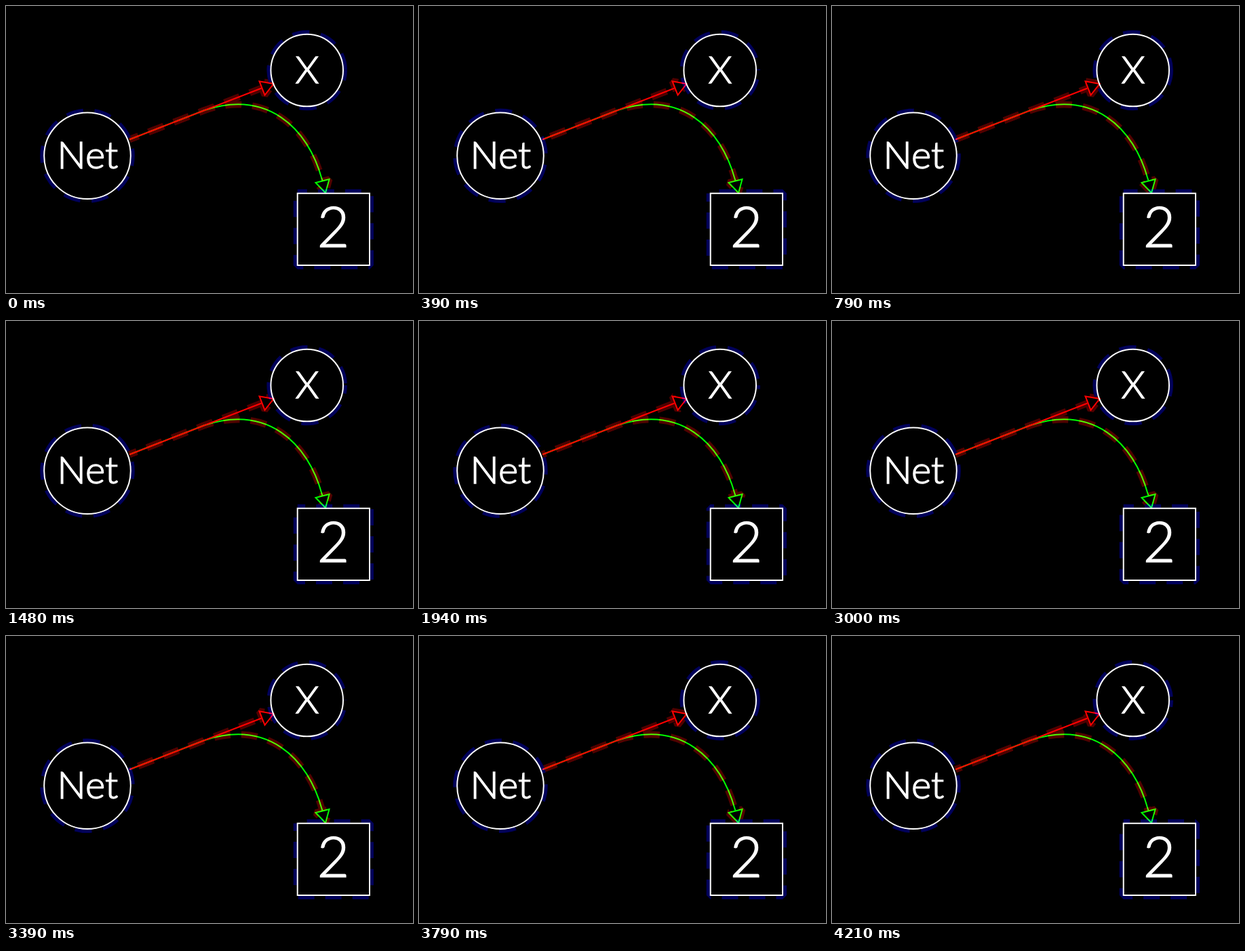
Recreate the animation shown at these times as an HTML page. Size 600 px wide and 424 px high, loop 4240 ms.

```html
<!DOCTYPE html>
<html lang="en">
<head>
<meta charset="utf-8">
<title>Graph</title>
<style>
  html, body { margin: 0; width: 100%; height: 100%; overflow: hidden; background: #000; }
  svg { display: block; width: 600px; height: 424px; }
  .halo { fill: none; stroke-width: 12; stroke-dasharray: 24 16; stroke-linejoin: bevel; }
  .node { fill: #000; stroke: #fff; stroke-width: 2; }
  .edges { fill: none; stroke-width: 2; mix-blend-mode: screen; }
  .red { stroke: #f00; }
  .green { stroke: #0f0; }
  #edgeHalos { stroke: #500000; }
  #edgeHalos .halo { stroke-width: 10; }
  #nodeHalos { stroke: #00005a; }
  text { font: 300 56px Lato, "Open Sans", sans-serif; fill: #fff; stroke: #fff; stroke-width: 1.4; }
</style>
</head>
<body>
<svg viewBox="0 0 600 424">
  <defs>
    <path id="line" d="M182 197.2L376.5 121.5"/>
    <path id="lineHead" d="M394.5 115L373.5 111.2L381.5 131.6Z"/>
    <path id="curve" d="M182 197.2L292 154.2C384 123.5 445 178 466.3 257.8"/>
    <path id="curveHead" d="M471 276L456.5 261L476.5 256Z"/>
    <path id="net" d="M183.8 221.3A63.8 63.8 0 1 1 56.2 221.3A63.8 63.8 0 1 1 183.8 221.3Z"/>
    <path id="x" d="M497 95A53.3 53.3 0 1 1 390.4 95A53.3 53.3 0 1 1 497 95Z"/>
    <path id="two" d="M429.7 276.8H536V383H429.7Z"/>
  </defs>
  <g id="edgeHalos"></g>
  <use href="#lineHead"/>
  <use href="#curveHead"/>
  <g id="nodeHalos"></g>
  <g class="node">
    <use href="#net"/><use href="#x"/><use href="#two"/>
  </g>
  <g class="edges">
    <g class="green"><use href="#curve"/><use href="#curveHead"/></g>
    <g class="red"><use href="#line"/><use href="#lineHead"/></g>
  </g>
  <text x="75.5" y="239.5">Net</text>
  <text x="444" y="113.5" text-anchor="middle">X</text>
  <text x="482.5" y="356.3" text-anchor="middle" style="font-size:82px">2</text>
</svg>
<script>
  const PERIOD = 40;
  const START = 30;
  const CYCLE = 4240 / 17;

  // Dashes march forward along the path, one period per cycle.
  function march(parent, id) {
    const halo = document.createElementNS("http://www.w3.org/2000/svg", "use");
    halo.setAttribute("href", "#" + id);
    halo.setAttribute("class", "halo");
    document.getElementById(parent).append(halo);
    halo.animate(
      [{ strokeDashoffset: -START }, { strokeDashoffset: -START - PERIOD }],
      { duration: CYCLE, iterations: Infinity }
    );
  }

  for (const id of ["line", "lineHead", "curve", "curveHead"]) march("edgeHalos", id);
  for (const id of ["net", "x", "two"]) march("nodeHalos", id);
</script>
</body>
</html>
```
